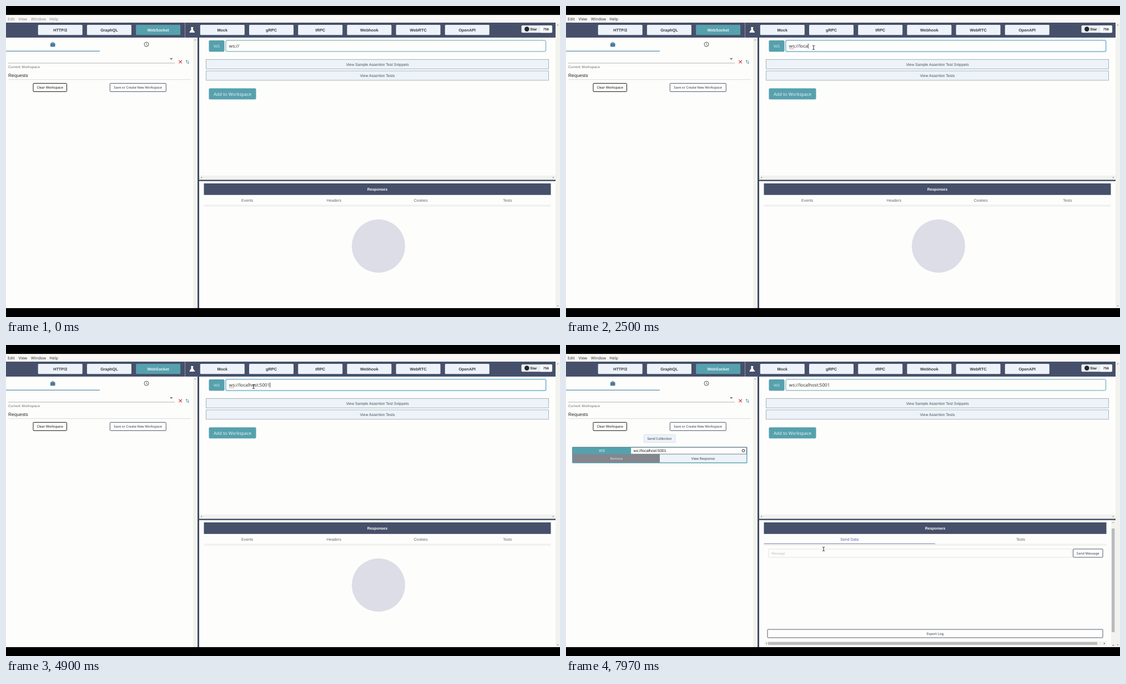
These frames come from a looping animation (998x561 px, 8000 ms). An HTML page:

```html
<!DOCTYPE html>
<html lang="en">
<head>
<meta charset="utf-8">
<title>WebSocket request</title>
<style>
  html, body { margin: 0; width: 100%; height: 100%; overflow: hidden; background: #000; }
  svg { display: block; width: 100%; height: 100%; }
  text { text-rendering: geometricPrecision; white-space: pre; }
  .sans { font-family: "Liberation Sans", Arial, sans-serif; }
  .noto { font-family: "Noto Sans", "Open Sans", sans-serif; }
</style>
</head>
<body>
<svg id="stage" viewBox="0 0 998 561"></svg>
<script>
const LOOP = 8000;
const TEAL = '#56a1ad', PALE = '#edf3f8', SLATE = '#46506a', INK = '#363a42', PAPER = '#fdfdfc', TRACK = '#f2f2ef';

const rect = (x, y, w, h, fill, extra = '') =>
  `<rect x="${x}" y="${y}" width="${w}" height="${h}" fill="${fill}" ${extra}/>`;
const box = (x, y, w, h, stroke, fill = PAPER, radius = 1) =>
  rect(x, y, w, h, fill, `stroke="${stroke}" rx="${radius}"`);
const label = (font, x, y, str, size, fill = INK, extra = '') =>
  `<text class="${font}" x="${x}" y="${y}" font-size="${size}" fill="${fill}" ${extra}>${str}</text>`;
const sans = (...args) => label('sans', ...args);
const noto = (...args) => label('noto', ...args);
const MID = 'text-anchor="middle"';
const BOLD = 'font-weight="700"';
const path = (d, stroke, width = 1, fill = 'none') =>
  `<path d="${d}" stroke="${stroke}" stroke-width="${width}" fill="${fill}"/>`;
const arrow = (x, y, angle, size = 1.6, fill = '#777') =>
  `<path transform="translate(${x} ${y}) rotate(${angle})" d="M${-size} ${size / 2}L0 ${-size / 2}L${size} ${size / 2}Z" fill="${fill}"/>`;
const group = (id, body) => `<g id="${id}">${body}</g>`;

function navBar() {
  const names = ['HTTP/2', 'GraphQL', 'WebSocket', 'Mock', 'gRPC', 'tRPC', 'Webhook', 'WebRTC', 'OpenAPI'];
  const buttons = names.map((name, i) => {
    const x = i < 3 ? 57.7 + i * 88.2 : 349.8 + (i - 3) * 88.2;
    const active = name === 'WebSocket';
    return rect(x, 34, 80, 18.3, active ? TEAL : PALE, 'rx="1.5"') +
      sans(x + 40, 45.8, name, 7.28, active ? '#e9f4f5' : INK, `${BOLD} ${MID}`);
  });
  return rect(0, 30, 990, 27, SLATE) + buttons.join('') +
    path('M322.5 30V57', '#a2a8b5', .8) +
    path('M333 38.5H337.5M334 39V42.5L330.8 47.4H339.8L336.5 42.5V39Z', '#fff', 1, '#fff') +
    rect(928.5, 35, 55.5, 13.2, '#ebf0f4', 'rx="2"') + rect(962, 35, 22, 13.2, '#fff', 'rx="2"') +
    path('M961.8 35V48.2', '#cdd3d8', .6) + '<circle cx="938.3" cy="41.6" r="4.3" fill="#24292f"/>' +
    sans(944.3, 43.9, 'Star', 6.3, '#24292f', BOLD) + sans(972.7, 43.9, '756', 6.3, '#24292f', `${BOLD} ${MID}`);
}

function sidebar() {
  return rect(337, 57, 8, 488, TRACK) + arrow(341, 61, 0) +
    rect(80, 67, 8.6, 6.4, '#4a7d9b', 'rx=".8"') + path('M82.5 67V65.6H86V67', '#4a7d9b') +
    '<circle cx="253" cy="69.2" r="4" fill="none" stroke="#555"/>' + path('M253 66.8V69.5L255 70.7', '#555', .8) +
    rect(0, 80.8, 169, 1.1, '#43829a') +
    path('M4 103H304', '#949494', .7) + arrow(297.8, 95.7, 180, 2.8, '#666') +
    path('M311.4 98L317 103.4M317 98L311.4 103.4', '#e2332d', 1.1) +
    path('M325.3 103V97.6M323.7 99.2L325.3 97.5L326.9 99.2', '#43829a', .8) +
    path('M328.3 98.6V104M326.7 102.4L328.3 104.1L329.9 102.4', '#43829a', .8) +
    sans(4, 111.7, 'Current Workspace', 6.24, '#6b6b6b', 'letter-spacing=".208"') +
    sans(4, 128.4, 'Requests', 8.32, '#222', 'letter-spacing=".078"') +
    path('M4 132.7H333', '#d2d2ce', .8) +
    box(49, 139.5, 60.5, 15, '#1c1c1c') + noto(79.2, 149.2, 'Clear Workspace', 6.05, '#111', MID) +
    box(187.3, 139.5, 101, 15, '#555b70') + noto(237.7, 149.2, 'Save or Create New Workspace', 5.97, INK, MID);
}

function composer() {
  return rect(365.5, 62, 28, 20.5, TEAL, 'rx="2"') + sans(379.5, 74.7, 'WS', 6.9, '#d5e9ec', MID) +
    group('inputGlow', rect(394.9, 60.9, 578.7, 22.3, '#b5d7e6', 'rx="2.6"')) +
    rect(396, 62, 576.5, 20, PAPER, 'id="input" rx="2"') +
    noto(401.8, 75.2, '', 8.1, '#363636', 'id="url"') +
    group('squiggle', path('M402 77q.75-1.3 1.5 0t1.5 0 1.5 0 1.5 0 1.5 0 1.5 0', '#e0443c', .7)) +
    rect(0, 67.7, .8, 9, '#222', 'id="caret"') +
    box(360.5, 96.5, 617, 17, '#a3b3bd', PALE, 0) +
    sans(669, 107.6, 'View Sample Assertion Test Snippets', 6.88, '#4a5260', MID) +
    box(360.5, 117, 617, 17, '#a3b3bd', PALE, 0) +
    sans(669, 128, 'View Assertion Tests', 6.88, '#4a5260', MID) +
    group('addShadow', rect(366.2, 149.4, 85.6, 20.4, '#4f5a66', 'rx="2"')) +
    group('addRing', rect(364.3, 147.3, 87.4, 22.6, '#b9d8dd', 'rx="3"')) +
    rect(365.5, 148.5, 85, 20, TEAL, 'rx="2"') + noto(408, 161.5, 'Add to Workspace', 8, '#e8f3f5', MID) +
    rect(348, 305.7, 642, 8, TRACK) + arrow(351.8, 309.4, -90) + arrow(986, 309.4, 90) +
    rect(348, 313.5, 642, 2.4, '#414d65');
}

const responseHead = width =>
  rect(356.5, 320, width, 20.8, SLATE) +
  sans(356.5 + width / 2, 332.6, 'Responses', 6.83, '#fff', `${BOLD} ${MID}`) +
  path(`M356.5 359.3h${width}M356.5 361.2h${width}`, '#e0e0dc', .7);

function emptyResponse() {
  const tabs = ['Events', 'Headers', 'Cookies', 'Tests'];
  return responseHead(625) +
    tabs.map((name, i) => sans(434.7 + i * 156.2, 353, name, 6.95, '#60646c', MID)).join('') +
    '<circle cx="671" cy="433" r="48" fill="#dcdde6"/>';
}

function openResponse() {
  return responseHead(617) +
    sans(510.7, 353, 'Send Data', 6.95, '#5a60ad', MID) + sans(819, 353, 'Tests', 6.95, '#60646c', MID) +
    rect(356.5, 357.8, 308.5, 1, '#7d83c0') +
    box(365, 368, 545.5, 15, '#e2e2e2') + noto(370, 377.7, 'Message', 5.9, '#bcbcbc') +
    box(913.5, 368, 53.5, 15, '#555b70') + noto(940.2, 377.7, 'Send Message', 6, INK, MID) +
    box(363, 513, 604, 15, '#555b70') + noto(665, 522.5, 'Export Log', 6, INK, MID) +
    rect(982, 316, 8, 229, TRACK) + rect(983, 331, 5.4, 187, '#b9bcbe') +
    arrow(985.8, 320, 0) + arrow(985.8, 542, 180, 1.6, '#333') +
    rect(357, 534.3, 617, 8, TRACK) + rect(364, 535.7, 593, 5.2, '#bcbcbc') +
    arrow(361, 538.4, -90) + arrow(970, 538.4, 90, 1.6, '#333');
}

function requestCard(x, y, width, right) {
  return rect(x, y, width, 12.2, PAPER, 'stroke="#555b66" stroke-width=".8"') +
    rect(x, y, 105, 12.2, TEAL) + sans(x + 52.5, y + 8.4, 'WS', 6.9, '#e4f1f3', MID) +
    sans(x + 109.3, y + 8.4, 'ws://localhost:5001', 6.95, '#222') +
    rect(x, y + 12.6, 157.5, 14.5, '#85868d') + noto(x + 78.7, y + 22.2, 'Remove', 6.05, '#e6e6e9', MID) + right;
}

const pendingCard = requestCard(10.7, 183, 316,
  rect(169, 195.6, 157.7, 14.5, TEAL, 'id="send"') +
  noto(247.7, 205.2, 'Send', 6.1, '#e8f3f5', `${MID} id="sendText"`));

const openCard = rect(11, 183.7, 315.5, 29.6, TEAL, 'rx="1.5"') + requestCard(12.2, 184.7, 313,
  rect(169, 197.3, 156.2, 14.5, PALE) + noto(247, 206.9, 'View Response', 6.05, INK, MID) +
  '<circle cx="319.6" cy="190.6" r="2.3" fill="#fff" stroke="#222"/>');

const cursors =
  group('ibeam', path('M-2-3.6Q0-3.6 0-2.6Q0-3.6 2-3.6M0-3V3M-2 3.6Q0 3.6 0 2.6Q0 3.6 2 3.6', '#222', .9)) +
  group('hand', path('M-2.2-3.2Q-1.2-3.8-.8-2.6L0-.6L2.2-.2Q3.2 .2 3 1.8L2.4 4H-.8L-3 1.2Q-2.8 .3-1.4 .8Z', '#3a2a2a', .8, '#fff')) +
  group('pointer', path('M-2-3.5V3.5L-.4 2L.7 4.4L1.8 3.9L.8 1.6H3Z', '#fff', .5, '#111'));

const menu = [['Edit', 3], ['View', 22.6], ['Window', 45], ['Help', 78.3]];
const stage = document.getElementById('stage');
stage.innerHTML = rect(0, 0, 998, 561, '#000') + rect(0, 16.3, 998, 528.7, PAPER) +
  rect(0, 16.3, 998, 13.7, '#faf8f6') +
  `<g id="menu">${menu.map(([name, x]) => noto(x, 25.6, name, 7.15, 'inherit')).join('')}</g>` +
  rect(990, 30, 8, 515, TRACK) + arrow(994, 34, 0) + arrow(994, 541, 180) +
  navBar() + sidebar() + rect(345, 57, 3, 488, '#414d65') + composer() +
  group('emptyResponse', emptyResponse()) + group('openResponse', openResponse()) +
  group('collection', box(140.3, 161.7, 56.5, 14, '#d5dfe8', PALE) +
    noto(168.5, 171.2, 'Send Collection', 6.1, INK, MID)) +
  group('pendingCard', pendingCard) + group('openCard', openCard) +
  group('cursor', cursors);
document.querySelectorAll('#menu text').forEach(node => node.removeAttribute('fill'));

const el = id => document.getElementById(id);
const show = (id, on) => el(id).setAttribute('display', on ? 'inline' : 'none');

const FOCUS = 950, ADD = 6150, SEND = 7130;
const keyTimes = [
  ...Array.from({ length: 10 }, (_, i) => 1950 + i * 150),
  3500, 3660, 3760, 3880
];
const FULL_URL = 'ws://localhost:5001';
const route = [
  [650, 480, 120], [900, 446, 75], [5100, 446, 75], [5700, 430, 165.5],
  [6250, 430, 165.5], [6780, 296, 205], [7250, 296, 205], [7850, 464, 368]
];

function cursorAt(t) {
  const next = route.findIndex(point => point[0] > t);
  if (next < 0) return route[route.length - 1].slice(1);
  const [t0, x0, y0] = route[Math.max(next - 1, 0)], [t1, x1, y1] = route[next];
  const p = Math.max(0, (t - t0) / (t1 - t0));
  const eased = p * p * (3 - 2 * p);
  return [x0 + (x1 - x0) * eased, y0 + (y1 - y0) * eased];
}

function draw(t) {
  const [x, y] = cursorAt(t);
  const over = (left, top, right, bottom) => x > left && x < right && y > top && y < bottom;
  const focused = t >= FOCUS && t < ADD - 60 + 0;
  const added = t >= ADD, sent = t >= SEND;
  const overAdd = over(365, 148, 451, 169);
  const overSend = added && over(169, 195, 327, 210);
  const overInput = over(396, 62, 972, 82) || (sent && over(365, 367, 910, 383));

  const typed = keyTimes.filter(time => time <= t);
  el('url').textContent = FULL_URL.slice(0, 5 + typed.length);
  const lastInput = typed.length ? typed[typed.length - 1] : FOCUS;
  show('caret', focused && (t - lastInput) % 1000 < 500);
  el('caret').setAttribute('x', 402 + el('url').getComputedTextLength());

  show('squiggle', focused);
  show('inputGlow', focused);
  el('input').setAttribute('stroke', focused ? '#56a2c4' : TEAL);
  el('menu').setAttribute('fill', t < FOCUS ? '#8f8d8b' : '#333');

  show('addShadow', overAdd);
  show('addRing', added && !sent && !overAdd);
  show('collection', added);
  show('pendingCard', added && !sent);
  show('openCard', sent);
  show('emptyResponse', !sent);
  show('openResponse', sent);
  el('send').setAttribute('fill', overSend ? TEAL : PALE);
  el('sendText').setAttribute('fill', overSend ? '#e8f3f5' : INK);

  const kind = overInput ? 'ibeam' : overAdd || overSend ? 'hand' : 'pointer';
  show('cursor', t >= route[0][0]);
  for (const name of ['ibeam', 'hand', 'pointer']) show(name, name === kind);
  el('cursor').setAttribute('transform', `translate(${x} ${y})`);
}

function tick() {
  draw(performance.now() % LOOP);
  requestAnimationFrame(tick);
}
tick();
</script>
</body>
</html>
```
